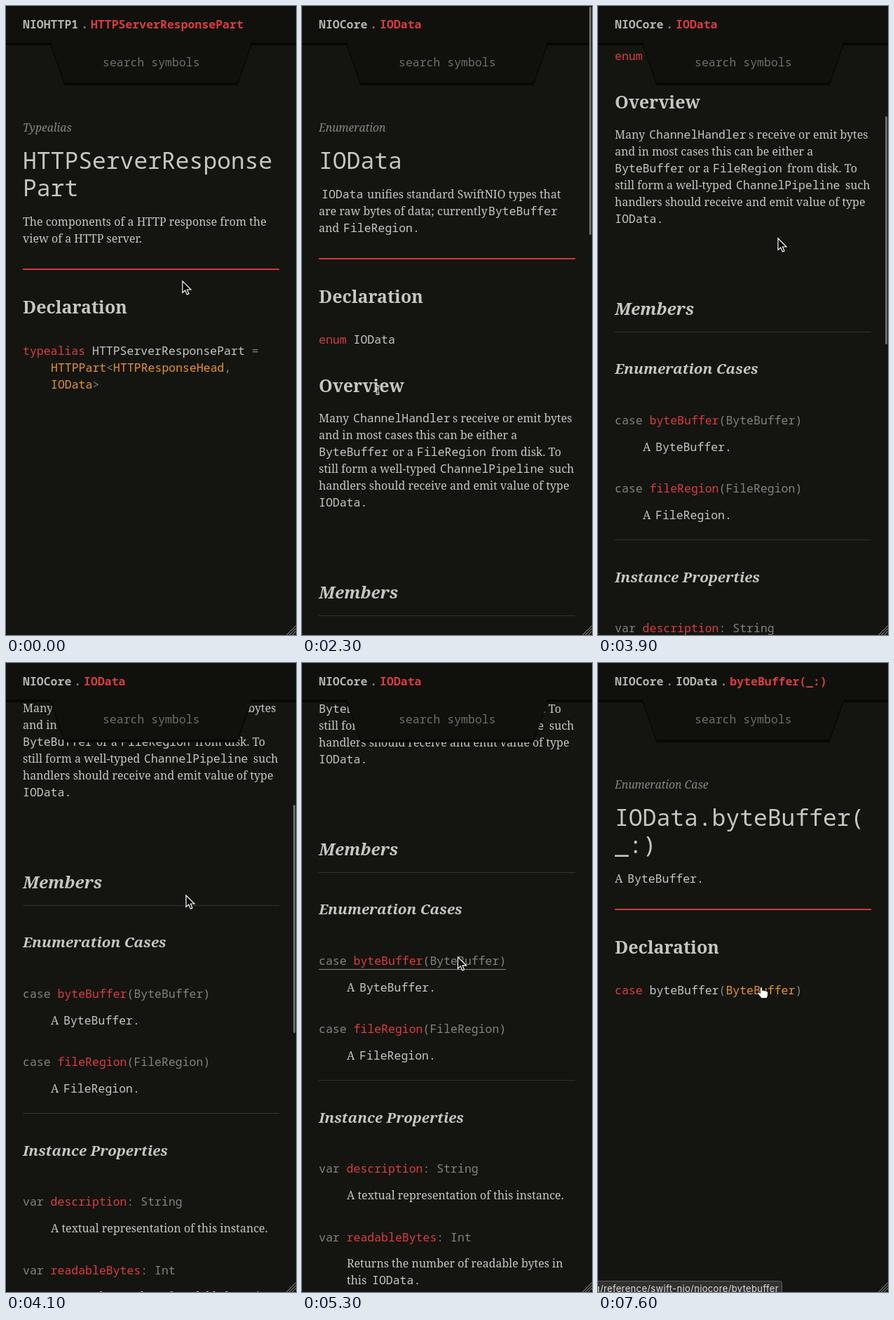
Write an HTML page that moves like this. It is 414 px wide and 896 px high and loops after 8 s.

```html
<!DOCTYPE html>
<html lang="en">
<head>
<meta charset="utf-8">
<title>Symbol reference</title>
<style>
  html, body { margin: 0; width: 100%; height: 100%; overflow: hidden; background: #141510; }
  svg { display: block; }
  text { fill: #c6c7c2; font: 16px "Noto Serif", serif; }
  .code, .title, .crumb { font-family: "Noto Sans Mono", monospace; font-size: 16.5px; }
  .title { font-size: 33px; font-weight: 300; }
  .crumb { font-weight: 600; fill: #b3b4af; }
  .kind { font-size: 15.7px; font-style: italic; fill: #868781; }
  .h2, .h3 { font-size: 25px; font-weight: 600; }
  .it { font-size: 24.2px; font-style: italic; }
  .h3 { font-size: 20.7px; }
  .red { fill: #da3c42; }
  .orange { fill: #e9932f; }
  .grey { fill: #82837d; }
  .dim { fill: #6d6e69; }
  #status rect { fill: #313230; stroke: #60615e; }
  #status text { font: 13px Inter, sans-serif; letter-spacing: .35px; fill: #dededc; text-anchor: end; }
</style>
</head>
<body>
<svg width="414" height="896" viewBox="0 0 414 896">
  <g id="pages"></g>
  <g id="header">
    <path d="M0 0H414V54H350L330.500 111H83.500L63.500 54H0Z" fill="#10110c"/>
    <path d="M63.500 54L83.500 111M350.500 54L330.500 111" stroke="#080905" stroke-width="1.500"/>
    <path d="M0 54H64M350 54H414M83 111H331" stroke="#070804" stroke-width="4"/>
    <text class="code dim" x="138" y="86">search symbols</text>
    <g id="crumbs"></g>
  </g>
  <rect id="thumb" x="410" width="3" height="325" rx="1.500" fill="#6d6e6b"/>
  <g id="status"><rect x="-5" y="880.500" height="30" rx="3"/><text y="895.500"></text></g>
  <path d="M400.500 896L414 882.500M404.500 896L414 886.500M408.500 896L414 890.500" stroke="#a2a39f"/>
  <g id="cursor">
    <path id="arrow" d="M0 0V16.500L3.800 13 6.400 19 9 17.900 6.500 12H12Z" fill="#000" stroke="#fff" stroke-width="1.200"/>
    <path id="hand" d="M-1.600 1.200Q0-.8 1.600 1.200V5Q3 4 4.400 5.400 6 4.600 7 6 9.500 5.600 9.600 8V11Q9.400 13.500 8.400 14.500V16H-.5V14.800Q-3 12-5.200 9.200-5 7-2.800 7.800L-1.600 9Z" fill="#fff" stroke="#000" stroke-width=".8"/>
    <g id="beam" fill="none" transform="translate(-1 1.500)">
      <path d="M-2.500-5.500Q0-5.500 0-4 0-5.500 2.500-5.500M0-4V4M-2.500 5.500Q0 5.500 0 4 0 5.500 2.500 5.500M-1.500 1.500H1.500" stroke="#fff" stroke-width="3"/>
      <path d="M-2.500-5.500Q0-5.500 0-4 0-5.500 2.500-5.500M0-4V4M-2.500 5.500Q0 5.500 0 4 0 5.500 2.500 5.500M-1.500 1.500H1.500" stroke="#000"/>
    </g>
  </g>
</svg>
<script>
const $ = id => document.getElementById(id);
const show = (el, on) => { el.style.display = on ? '' : 'none'; };

// Markup helpers
const text = (cls, x, y, s) => `<text class="${cls}" x="${x}" y="${y}">${s}</text>`;
const span = (cls, s) => `<tspan class="${cls}">${s}</tspan>`;
const red = s => span('red', s), orange = s => span('orange', s), grey = s => span('grey', s);
const code = (x, y, s) => text('code', x, y, s);
const body = (x, y, s) => text('', x, y, s);
const rule = (y, color, w) => `<path d="M24 ${y}H390" stroke="${color}" stroke-width="${w}"/>`;
const redRule = y => rule(y, '#cf393d', 2);
const thinRule = y => rule(y + .5, '#32332e', 1);
const heading = (y, s) => text('h2', 24, y, s);
const member = (y, keyword, name, rest) => code(24, y, grey(keyword) + ' ' + red(name) + grey(rest));
const inlineDot = (x, y, word) => code(x, y, word) + body(x + word.length * 9.9 + 3, y, '.');
const enumCase = (y, name, type) =>
  member(y, 'case', name, `(${type})`) + body(64, y + 37.5, 'A') + inlineDot(82, y + 37.5, type);

const pages = [
  {
    crumbs: ['NIOHTTP1', 'HTTPServerResponsePart'],
    content: text('kind', 24, 179, 'Typealias') +
      text('title', 24, 232, 'HTTPServerResponse') + text('title', 24, 271, 'Part') +
      body(24, 313, 'The components of a HTTP response from the') +
      body(24, 337, 'view of a HTTP server.') +
      redRule(375) + heading(438, 'Declaration') +
      code(24, 496.5, red('typealias') + ' HTTPServerResponsePart ' + grey('=')) +
      code(64, 521, orange('HTTPPart') + grey('&lt;') + orange('HTTPResponseHead') + grey(',')) +
      code(64, 545, orange('IOData') + grey('&gt;'))
  },
  {
    crumbs: ['NIOCore', 'IOData'],
    content: text('kind', 24, 179, 'Enumeration') + text('title', 24, 232, 'IOData') +
      code(28, 274, 'IOData') + body(93, 274, 'unifies standard SwiftNIO types that') +
      body(24, 298, 'are raw bytes of data; currently') + code(266, 298, 'ByteBuffer') +
      body(24, 322, 'and') + inlineDot(59, 322, 'FileRegion') +
      redRule(360) + heading(423, 'Declaration') +
      code(24, 481, red('enum') + ' IOData') + heading(550, 'Overview') +
      body(24, 593, 'Many') + code(73, 593, 'ChannelHandler') + body(215, 593, 's receive or emit bytes') +
      body(24, 617, 'and in most cases this can be either a') +
      code(24, 641, 'ByteBuffer') + body(129, 641, 'or a') + code(164, 641, 'FileRegion') +
      body(270, 641, 'from disk. To') +
      body(24, 665, 'still form a well-typed') + code(197, 665, 'ChannelPipeline') + body(353, 665, 'such') +
      body(24, 689, 'handlers should receive and emit value of type') +
      inlineDot(24, 713, 'IOData') +
      text('h2 it', 24, 844, 'Members') + thinRule(868) +
      text('h3 it', 24, 928, 'Enumeration Cases') +
      enumCase(1000, 'byteBuffer', 'ByteBuffer') + enumCase(1097, 'fileRegion', 'FileRegion') +
      '<path id="underline" d="M24 1006.500H291" stroke="#8a8b85"/>' +
      thinRule(1164) + text('h3 it', 24, 1225, 'Instance Properties') +
      member(1296, 'var', 'description', ': String') +
      body(64, 1334, 'A textual representation of this instance.') +
      member(1394, 'var', 'readableBytes', ': Int') +
      body(64, 1431, 'Returns the number of readable bytes in') +
      body(64, 1455, 'this') + inlineDot(100, 1455, 'IOData')
  },
  {
    crumbs: ['NIOCore', 'IOData', 'byteBuffer(_:)'],
    content: text('kind', 24, 179, 'Enumeration Case') +
      text('title', 24, 232, 'IOData.byteBuffer(') + text('title', 24, 271, '_:)') +
      body(24, 313, 'A') + inlineDot(42, 313, 'ByteBuffer') +
      redRule(351) + heading(414, 'Declaration') +
      code(24, 472, red('case') + ' byteBuffer' + grey('(') + orange('ByteBuffer') + grey(')'))
  }
];

function crumbTrail(names) {
  let x = 24, out = '';
  names.forEach((name, i) => {
    const last = i === names.length - 1;
    out += text(last ? 'crumb red' : 'crumb', x, 32, name);
    x += name.length * 9.9;
    if (!last) out += text('crumb grey', x + 4, 32, '.');
    x += 17.8;
  });
  return out;
}

$('pages').innerHTML = pages.map(p => `<g>${p.content}</g>`).join('');
$('crumbs').innerHTML = pages.map(p => `<g>${crumbTrail(p.crumbs)}</g>`).join('');
const [statusBox, statusText] = $('status').children;

const progress = (t, from, to) => Math.min(1, Math.max(0, (t - from) / (to - from)));
const smooth = p => p * p * (3 - 2 * p);

// Pointer moves: start, end, x, y
const moves = [
  [300, 400, 249, 393.5], [500, 1300, 109, 545.5], [3100, 3600, 257, 331],
  [4700, 5400, 220.5, 424], [7100, 7400, 233, 461.5]
];
function pointerAt(t) {
  let x = 252, y = 392;
  for (const [from, to, toX, toY] of moves) {
    const p = smooth(progress(t, from, to));
    x += (toX - x) * p;
    y += (toY - y) * p;
  }
  return [x, y];
}
function pointerKind(t) {
  if (t >= 2300 && t < 3300) return 'beam';
  const overLink = (t >= 1300 && t < 2300) || (t >= 5400 && t < 6000) || t >= 7400;
  return overLink ? 'hand' : 'arrow';
}

// Status bubble: start, end, right edge, text
const base = 'swiftinit.org/reference/swift-nio/niocore/';
const bubbles = [
  [1500, 2000, 234.5, base + 'iodata'],
  [5500, 6000, 328.5, base + 'iodata/bytebuffer(_:)'],
  [6000, 6400, 119.5, 'Waiting for response from swiftinit.org...'],
  [7600, 8000, 262.5, base + 'bytebuffer']
];
function drawStatus(t) {
  const bubble = bubbles.find(([from, to]) => t >= from && t < to);
  show($('status'), bubble);
  if (!bubble) return;
  const [, , right, label] = bubble;
  const shrink = t >= 6000 && t < 6400 ? 209 * (1 - progress(t, 5900, 6300)) : 0;
  statusBox.setAttribute('width', right + shrink + 5);
  statusText.setAttribute('x', right - 4.5);
  statusText.textContent = label;
  $('status').style.opacity = t === 1500 || t === 5500 ? .5 : 1;
}

function draw(t) {
  const blank = t === 2000;
  const page = t < 2000 ? 0 : t < 6400 ? 1 : 2;
  for (const id of ['pages', 'crumbs'])
    [...$(id).children].forEach((g, i) => show(g, i === page && !blank));
  show($('header'), !blank);

  const scroll = Math.round(570 * (1 - (1 - progress(t, 3600, 4475)) ** 2.94));
  $('pages').children[1].setAttribute('transform', `translate(0 ${-scroll})`);
  show($('underline'), t >= 5300);

  show($('thumb'), page === 1 && !blank);
  $('thumb').setAttribute('y', Math.round(.6 + scroll * .386));
  $('thumb').style.opacity = t < 6000 ? 1 - progress(t, 4700, 5000) : 1;

  drawStatus(t);
  $('cursor').setAttribute('transform', `translate(${pointerAt(t)})`);
  for (const kind of ['arrow', 'hand', 'beam']) show($(kind), kind === pointerKind(t));
}

function tick() {
  draw(Math.floor(performance.now() % 8000 / 100) * 100);
  requestAnimationFrame(tick);
}
tick();
</script>
</body>
</html>
```
